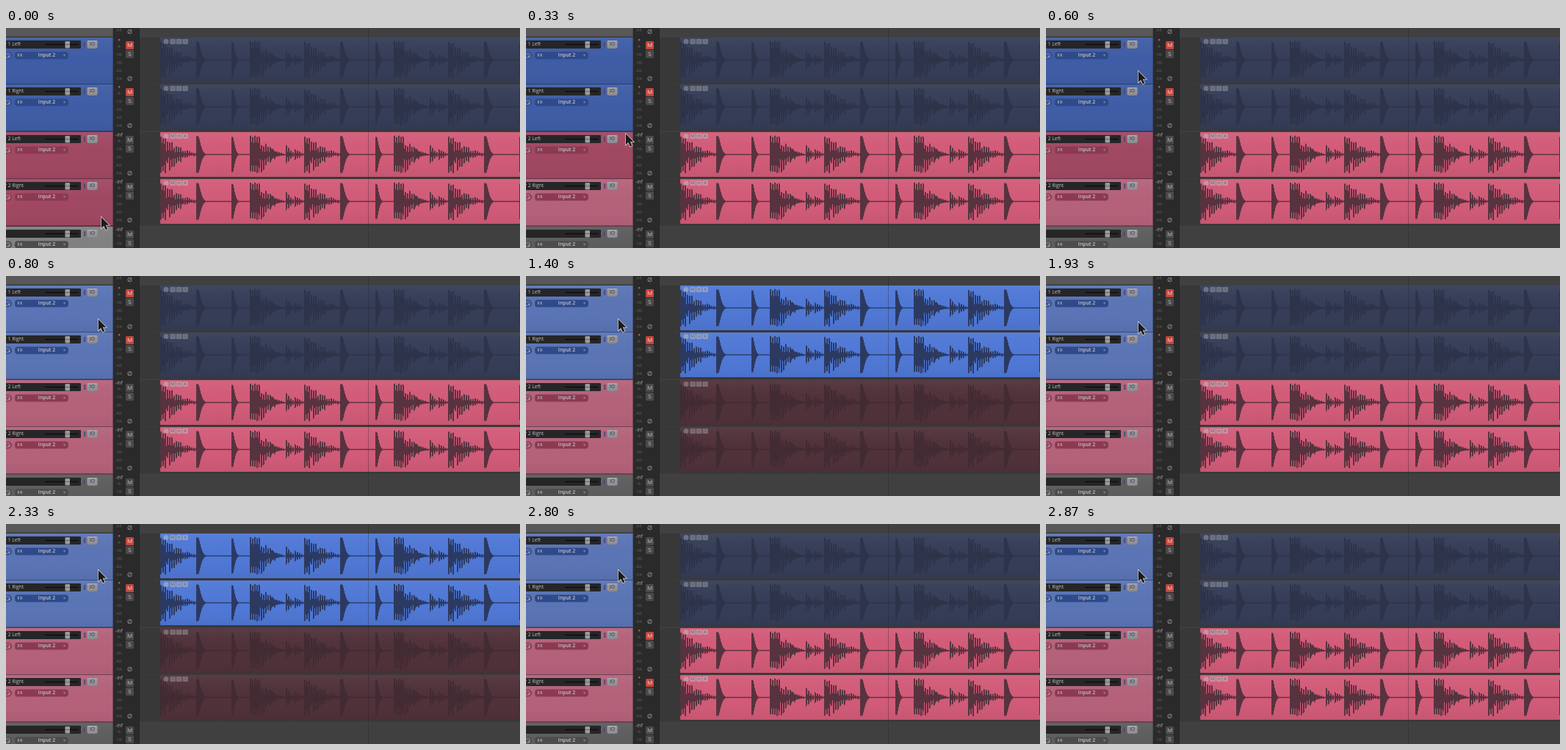
Write an HTML page with a canvas that moves like this. It is 700 by 300 pixels and loops after 3130 ms.

```html
<!DOCTYPE html>
<html lang="en">
<head>
<meta charset="utf-8">
<title>Muting tracks</title>
<style>
html, body { margin: 0; height: 100%; overflow: hidden; background: #3e3e3e; }
canvas { display: block; }
</style>
</head>
<body>
<canvas id="stage" width="700" height="300"></canvas>
<script>
const ctx = document.getElementById('stage').getContext('2d');
const LOOP = 3130, PITCH = 64.4, TOP = 13;

const blue = {
  panel: ['#3f5da6', '#5a74b5'], pill: '#2f4a8a',
  clip: ['#4f78d6', '#353d57'], wave: ['#2c3a62', '#2d3449']
};
const pink = {
  panel: ['#a14862', '#b4627a'], pill: '#8c3a52',
  clip: ['#d25b78', '#50313a'], wave: ['#57333f', '#422b32']
};
const grey = { panel: ['#5c5c5c', '#808080'], pill: '#4c4c4c' };
const tracks = [['ar 1 Left', blue], ['ar 1 Right', blue], ['ar 2 Left', pink], ['ar 2 Right', pink], ['', grey]];

// start, height, hold, decay, roughness within one bar of 196 px
const hits = [
  [0, 26, 8, 22, .6], [49, 25, 2.5, 4.5, 0], [97, 24, 1.5, 3.5, 0],
  [122, 26, 13, 17, .6], [150, 8, 2, 10, .5], [171, 13, 1, 7, .3], [183, 8, 1, 8, .3]
];
const noise = n => { const v = Math.sin(n * 127.1 + 4) * 43758.5453; return v - Math.floor(v); };

// Rough hits are rows of spikes, three pixels apart.
function level(x, side) {
  const p = x % 196;
  let best = .7;
  for (const [start, height, hold, decay, rough] of hits) {
    const d = p - start;
    if (d < 0) continue;
    const held = d < hold;
    const peak = 1 - rough * noise(Math.floor(d / 3) + start + side * .37) * (held ? .25 : 1);
    const gap = rough && d % 3 == 2 ? (held ? .65 : .35) : 1;
    best = Math.max(best, height * Math.exp(-((Math.max(0, d - hold) / decay) ** 1.5)) * peak * gap);
  }
  return best;
}

function rect(x, y, w, h, color, r = 0) {
  ctx.fillStyle = color;
  ctx.beginPath();
  ctx.roundRect(x, y, w, h, r);
  ctx.fill();
}

function shade(x, y, w, h, top, bottom) {
  const g = ctx.createLinearGradient(0, y, 0, y + h);
  g.addColorStop(0, `rgba(255,255,255,${top})`);
  g.addColorStop(.5, 'rgba(128,128,128,0)');
  g.addColorStop(1, `rgba(0,0,0,${bottom})`);
  rect(x, y, w, h, g);
}

function label(s, x, y, size, color, align = 'center', weight = 400) {
  ctx.font = `${weight} ${size}px "Open Sans", sans-serif`;
  ctx.textAlign = align;
  ctx.textBaseline = 'middle';
  ctx.fillStyle = color;
  ctx.fillText(s, x, y);
}

function ring(x, y, r, color, width = 1) {
  ctx.strokeStyle = color;
  ctx.lineWidth = width;
  ctx.beginPath();
  ctx.arc(x, y, r, 0, 7);
  ctx.stroke();
}

function line(x1, y1, x2, y2, color, width = 1) {
  ctx.strokeStyle = color;
  ctx.lineWidth = width;
  ctx.beginPath();
  ctx.moveTo(x1, y1);
  ctx.lineTo(x2, y2);
  ctx.stroke();
}

function panel(y, name, look, selected) {
  rect(0, y, 145.5, PITCH, look.panel[+selected]);
  shade(0, y, 145.5, PITCH, .05, .05);
  rect(0, y + PITCH - 1.5, 145.5, 1.5, 'rgba(20,20,25,.4)');

  // name and fader
  rect(-4, y + 4, 106, 11, '#262628', 1);
  label(name, name.endsWith('Left') ? 20 : 24, y + 9.5, 6.6, '#c0c0c0', 'right');
  line(53, y + 9.5, 98, y + 9.5, '#0e0e10', 1.5);
  rect(80.5, y + 5, 6.5, 9.5, '#9a9a9a', 1);
  rect(80.5, y + 9, 6.5, 1, '#6a6a6a');

  rect(106, y + 6, 1.5, 7, '#394a80');
  rect(108.3, y + 6, 1.2, 7, '#8a5060');
  rect(110.5, y + 4, 14, 11, '#96969c', 2);
  shade(110.5, y + 4, 14, 11, .2, .1);
  label('IO', 117.5, y + 9.5, 7, '#4a4a50', 'center', 600);

  // input row
  rect(-6, y + 19.5, 14, 10, look.pill, 5);
  ring(2.5, y + 24.5, 3, '#a9a9b2', .9);
  line(2.5, y + 24.5, 5, y + 26.5, '#c5c5cc');
  rect(12, y + 19.5, 73, 10, look.pill, 4);
  label('FX', 19, y + 24.5, 6, '#bcbcc6', 'center', 600);
  label('Input 2', 55.5, y + 24.5, 6.8, '#c6c6d0', 'center', 600);
  label('▾', 79.5, y + 24.5, 6, '#85859a');
}

function button(s, y, lit) {
  rect(163, y, 11, 11, lit ? '#c4463f' : '#4a4a4a', 1.5);
  label(s, 168.5, y + 5.7, 8, lit ? '#f0dcd8' : '#bcbcbc');
}

function phase(y) {
  ring(168.5, y, 2.6, '#707070', 1.2);
  line(166.5, y + 2.5, 170.5, y - 2.5, '#808080', .9);
}

function meter(y, muted) {
  if (muted) rect(153, y + 2, 2.4, 2.4, '#b0605a', 1);
  else label('-inf', 154, y + 4, 6.5, '#b0b0b0');
  [6, 18, 30, 42, 54].forEach((v, i) => label(`-${v}-`, 154, y + 12.5 + i * 10.9, 5.5, '#666'));
  button('M', y + 5, muted);
  button('S', y + 17, false);
  phase(y + 56);
}

function clip(y, look, muted) {
  const k = +muted, mid = y + 30.5;
  rect(210, y, 490, 61, look.clip[k], 1);
  shade(210, y, 490, 61, .05, .06);
  ctx.fillStyle = look.wave[k];
  for (let x = 0; x < 490; x++) {
    const up = level(x, 0), down = level(x, 1);
    ctx.fillRect(210 + x, mid - up, 1, up + down);
  }
  line(493.5, y, 493.5, y + 61, 'rgba(25,25,30,.3)');

  // item badges
  ctx.globalAlpha = muted ? .4 : .6;
  rect(214.5, y + 2, 7, 7, '#b8b8c0', 3.5);
  ['M', 'π', '∧'].forEach((s, i) => {
    rect(223.3 + i * 8.5, y + 2, 7.6, 7, '#b8b8c0', 1);
    label(s, 227 + i * 8.5, y + 5.7, 6, '#55555e', 'center', 600);
  });
  ctx.globalAlpha = 1;
}

function cursor(x, y) {
  const path = new Path2D('M0 0V16L3.7 12.6 6.3 18.4 9 17.2 6.4 11.5H11.3Z');
  ctx.save();
  ctx.translate(x + .8, y + 1);
  ctx.scale(.94, .94);
  ctx.lineWidth = 1.6;
  ctx.strokeStyle = '#d4d4d4';
  ctx.stroke(path);
  ctx.fillStyle = '#1b1b1d';
  ctx.fill(path);
  ctx.restore();
}

// Steps run at 15 per second; the first group plays in two spans.
const firstPlays = (n, lag) => (n >= 21 + lag && n < 28 + lag) || (n >= 35 + lag && n < 42 + lag);

function draw(t) {
  const n = Math.floor((t + 4) * .015);
  const clipsFirst = firstPlays(n, 0), buttonsFirst = firstPlays(n, 1);

  rect(0, 0, 700, 300, '#404040');
  rect(145.5, 0, 35.5, 300, '#2a2a2a');
  rect(181, 0, 1, 300, '#242424');
  rect(0, 0, 145.5, 12, '#585858');
  rect(0, 11.5, 145.5, 1.5, '#383838');
  label('-54-', 154, 4, 5.5, '#666');
  phase(5);
  line(493.5, 0, 493.5, 300, '#333');

  tracks.forEach(([name, look], i) => {
    const y = Math.round(TOP + i * PITCH);
    const selected = i == 4 ? n < 2 : i == 3 ? n >= 2 : n >= 10;
    panel(y, name, look, selected);
    meter(y, i < 4 && (i < 2) != buttonsFirst);
    if (i < 4) {
      rect(182, y, 518, PITCH - 1, '#383838');
      clip(y, look, (i < 2) != clipsFirst);
    }
  });

  const u = Math.min(1, Math.max(0, (n - 1) / 7.3));
  const e = u * u * (3 - 2 * u);
  const nudge = 2 * Math.min(2, Math.max(0, n - 21));
  cursor(129 - 4 * e + 34 * e * (1 - e), 257 - 199 * e + nudge);
}

const begin = performance.now();
function tick() {
  draw((performance.now() - begin) % LOOP);
  requestAnimationFrame(tick);
}
tick();
</script>
</body>
</html>
```
